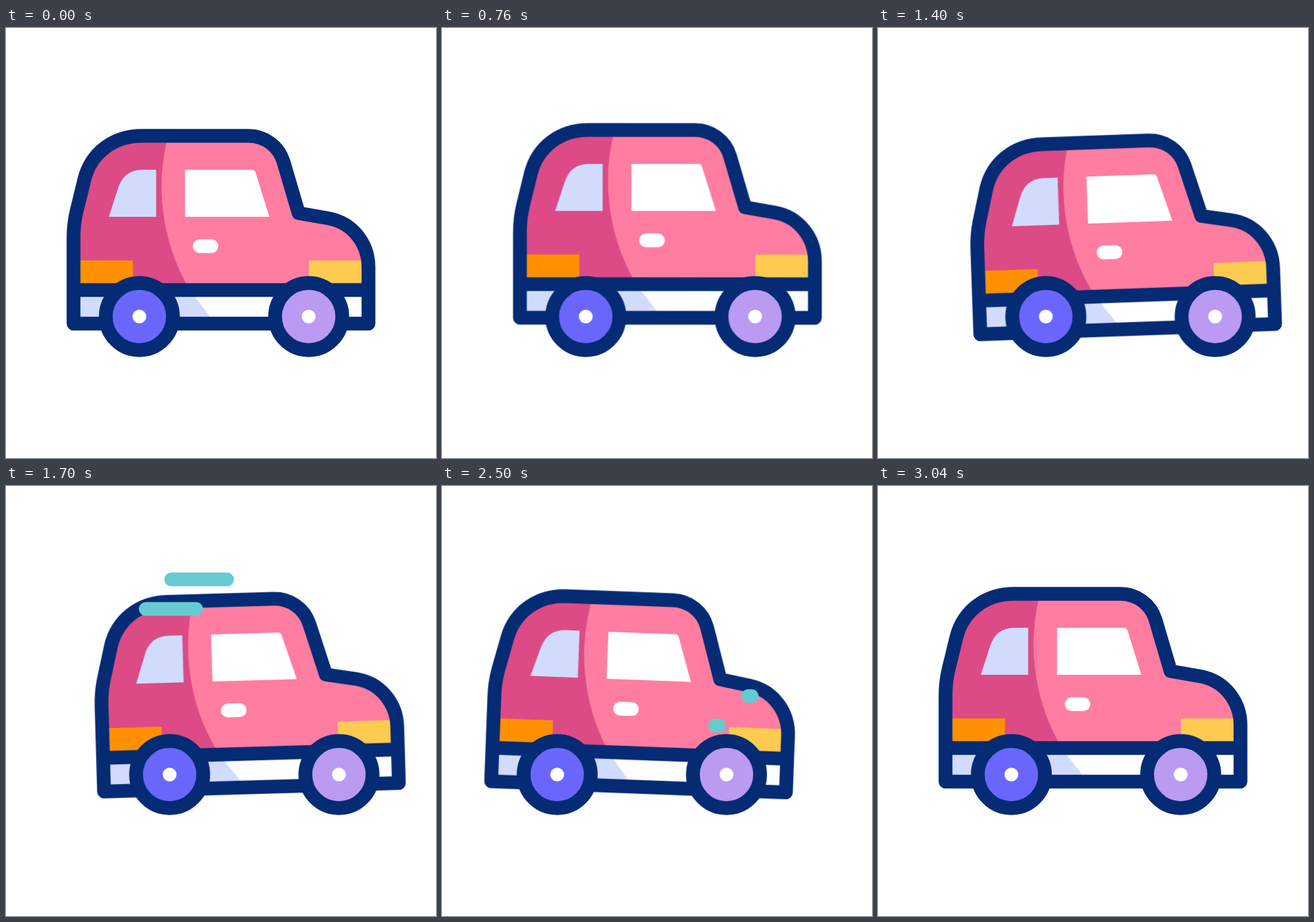
Write an HTML page that moves like this. It is 640 px wide and 640 px high and loops after 3600 ms.

```html
<!DOCTYPE html>
<html lang="en">
<head>
<meta charset="utf-8">
<title>Little car</title>
<style>
  html, body { margin: 0; width: 100%; height: 100%; overflow: hidden; background: #fff; }
  svg { display: block; width: 100vw; height: 100vh; }

  .drive, .hop, .tilt, .wind path {
    animation: 3600ms cubic-bezier(.333, 0, .667, 1) infinite both;
  }
  .drive { animation-name: drive; }
  .hop { animation-name: hop; }
  .tilt { animation-name: tilt; transform-origin: 320px 430px; }

  /* back up, dash forward, pause, reverse, settle */
  @keyframes drive {
    0% { transform: translateX(0); }
    8.89% { transform: translateX(-39px); }
    30.4%, 44.6% { transform: translateX(51.3px); }
    61.1% { transform: translateX(-39px); }
    83.9%, 100% { transform: translateX(0); }
  }
  @keyframes tilt {
    0% { transform: rotate(0deg); }
    8.89% { transform: rotate(3.1deg); }
    30.4%, 44.6% { transform: rotate(-2deg); }
    61.1% { transform: rotate(3.1deg); }
    83.9%, 100% { transform: rotate(0deg); }
  }
  @keyframes hop {
    0% { transform: translateY(0); }
    8.89%, 11.67% { transform: translateY(11.2px); }
    21.9% { transform: translateY(-9px); }
    32.8%, 44.6% { transform: translateY(8.2px); }
    61.1% { transform: translateY(11.2px); }
    83.9%, 100% { transform: translateY(0); }
  }

  .wind path {
    fill: none;
    stroke: #66cbd0;
    stroke-width: 20.5;
    stroke-linecap: round;
    stroke-dasharray: 100 400;
    animation-name: gust;
    animation-delay: var(--at);
  }
  @keyframes gust {
    0% { stroke-dashoffset: 101; }
    6%, 8% { stroke-dashoffset: 0; }
    14%, 100% { stroke-dashoffset: -101; }
  }
</style>
</head>
<body>
<svg viewBox="0 0 640 640">
  <defs>
    <path id="shell" d="M100.5 440V312Q100.5 292 105 273L117 224C127 186 160 160.5 202 160.5H361C385 160.5 406 176 413 199L435.500 275.500L481 283.500C515 290 539.500 320 539.500 356V440Z"/>
    <clipPath id="inside"><use href="#shell"/></clipPath>
  </defs>

  <g class="drive">
    <g class="hop"><g class="tilt">
      <g clip-path="url(#inside)">
        <path fill="#ff7da0" d="M90 150H550V390H90Z"/>
        <path fill="#dc4b85" d="M90 150H244L239 170C224 235 231 312 268 380L274 390H90Z"/>
        <path fill="#fff" d="M90 390H550V440H90Z"/>
        <path fill="#d1dcfd" d="M90 390H273L312 440H90Z"/>
        <path fill="#ff9100" d="M100 346H189V390H100Z"/>
        <path fill="#fdcb50" d="M451 346H540V390H451Z"/>
      </g>
      <path fill="#d1dcfd" d="M153 281L167 238Q176 211 203 211H223.500V281Z"/>
      <path fill="#fff" d="M266.500 211H366Q370 211 371.200 214.500L392 281H266.500Z"/>
      <rect x="278" y="314.500" width="38" height="20.500" rx="10.250" fill="#fff"/>
      <g fill="none" stroke="#042b74" stroke-width="20.500" stroke-linejoin="round">
        <use href="#shell"/>
        <path d="M100.500 390H539.500"/>
      </g>
    </g></g>

    <g stroke="#042b74" stroke-width="20.500">
      <circle cx="198.500" cy="429.500" r="50" fill="#6a66fb"/>
      <circle cx="450.500" cy="429.500" r="50" fill="#ba9af2"/>
    </g>
    <g fill="#fff">
      <circle cx="198.500" cy="429.500" r="10.300"/>
      <circle cx="450.500" cy="429.500" r="10.300"/>
    </g>
  </g>

  <g id="wind" class="wind"></g>
</svg>
<script>
  // start time, then [right, left, y] for each streak
  const gusts = [
    [240, [188, 78, 364], [265, 140, 408.5]],
    [880, [516, 413, 313.7], [470, 368, 360.5]],
    [1460, [329, 246, 139], [283, 208, 183]],
    [1927, [188, 78, 364], [265, 140, 408.5]],
    [2468, [461, 358, 312.7], [412, 310, 356.5]]
  ];
  document.getElementById('wind').innerHTML = gusts.map(([at, ...streaks]) =>
    streaks.map(([right, left, y]) =>
      `<path pathLength="100" style="--at:${at}ms" d="M${right} ${y}H${left}"/>`
    ).join('')
  ).join('');
</script>
</body>
</html>
```
